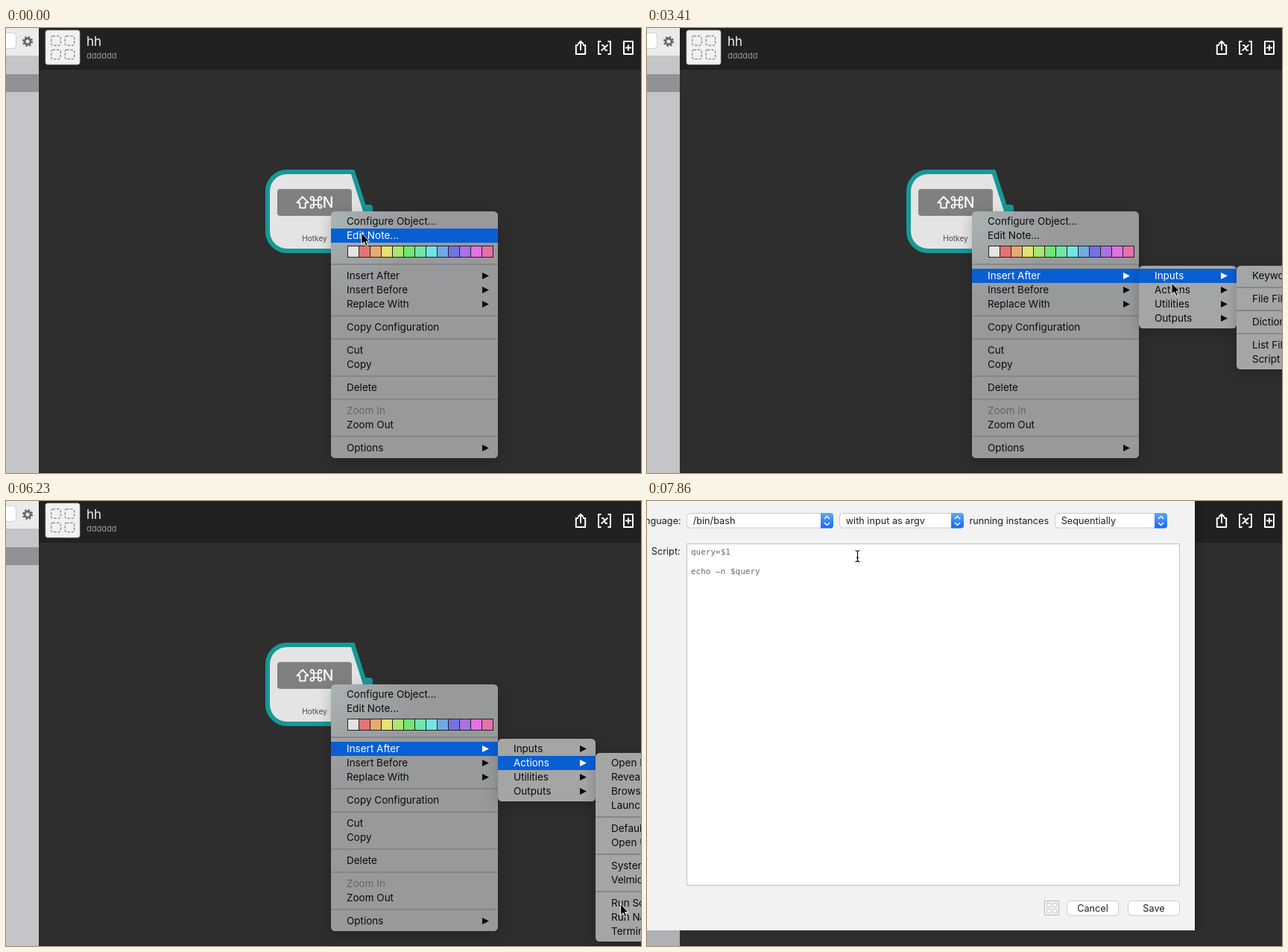
These frames come from a looping animation (852 by 597 pixels, 8 s). An HTML page:

```html
<!DOCTYPE html>
<html lang="en">
<head>
<meta charset="utf-8">
<title>Context menu</title>
<style>
html, body { margin: 0; width: 100%; height: 100%; overflow: hidden; background: #2e2e2e; }
svg { display: block; width: 100vw; height: 100vh; font-family: Inter, "Open Sans", sans-serif; }
text { white-space: pre; }
.menu { filter: drop-shadow(0 5px 9px rgba(0,0,0,.22)); }
.row { font-size: 13.5px; fill: #0b0b0c; }
.row rect { fill: none; }
.row.off { fill: #646669; }
.row.on { fill: #fff; }
.row.on rect { fill: #075fd3; }
.form { font-size: 12.7px; fill: #1f1f1f; }
.code { font: 11px "DejaVu Sans Mono", monospace; fill: #696969; }
.mid { text-anchor: middle; }
.end { text-anchor: end; }
</style>
</head>
<body>
<svg id="stage" viewBox="0 0 852 597" preserveAspectRatio="none"></svg>
<script>
const LOOP = 8000, TICKS = 54, TICK = LOOP / TICKS;
const TEAL = '#179896';
const stage = document.getElementById('stage');

const rect = (x, y, w, h, fill, more = '') =>
  `<rect x="${x}" y="${y}" width="${w}" height="${h}" fill="${fill}" ${more}/>`;
const text = (x, y, s, more = '') => `<text x="${x}" y="${y}" ${more}>${s}</text>`;
const path = (d, more = '') => `<path d="${d}" ${more}/>`;
const line = (d, color, w, more = '') =>
  path(d, `fill="none" stroke="${color}" stroke-width="${w}" ${more}`);
const group = (id, body, more = '') => `<g id="${id}" ${more}>${body}</g>`;

// Four dashed squares in a tile
function tile(x, y, size, color, w) {
  const s = size * .27, a = size * .17, b = size * .57;
  return [[a, a], [b, a], [a, b], [b, b]].map(([dx, dy]) =>
    rect(x + dx, y + dy, s, s, 'none',
      `rx="${size * .04}" stroke="${color}" stroke-width="${w}" stroke-dasharray="${size * .075} ${size * .04}"`)).join('');
}

function backdrop() {
  return rect(0, 0, 852, 597, '#2e2e2e') + rect(44, 0, 808, 56, '#212121') +
    rect(44, 596, 808, 1, '#232323') +
    rect(0, 0, 44, 597, '#c4c5c9') + rect(0, 0, 44, 37, '#ebebeb') + rect(0, 62, 44, 24, '#919296') +
    rect(-10, 6.5, 23.5, 21, '#fff', 'rx="4" stroke="#cfcfcf"') +
    '<g fill="none" stroke="#666"><circle cx="29" cy="18" r="4" stroke-width="2.8"/>' +
    '<circle cx="29" cy="18" r="6" stroke-width="2.2" stroke-dasharray="2.36 2.352"/></g>' +
    rect(53, 3, 46, 46, '#f1f1f1', 'rx="3" stroke="#bbb" stroke-width="1" stroke-dasharray="2 1"') +
    tile(53, 3, 46, '#666', 1) +
    text(108, 24, 'hh', 'font-size="17" fill="#f5f5f5"') +
    text(108, 41, 'dddddd', 'font-size="11" fill="#9b9b9b"');
}

function toolIcons() {
  return '<g stroke-linejoin="round">' +
    line('M768 23H764.8V35H777.2V23H774M771 30V18.5M767.3 21.5L771 17.8L774.7 21.5', '#fff', 2) +
    line('M798.5 18H795V35H798.5M807.5 18H811V35H807.5', '#fff', 2) +
    line('M799 23.5Q802 21.5 803 26.5T807 29.5M807.5 22.5L798.5 30.5', '#fff', 1.8) +
    line('M829 18H841V35H829ZM835 22.5V30.5M831 26.5H839', '#fff', 2) + '</g>';
}

const HOTKEY = 'M377 196H463L479 246L463 296H377A23 23 0 0 1 354 273V219A23 23 0 0 1 377 196Z';

function hotkey() {
  const loop = 'M413 231V237M419 231V237M413 231H419M413 237H419' +
    'M413 231H411A2.3 2.3 0 1 1 413 229ZM419 231V229A2.3 2.3 0 1 1 421 231Z' +
    'M419 237H421A2.3 2.3 0 1 1 419 239ZM413 237V239A2.3 2.3 0 1 1 411 237Z';
  return group('ring', path(HOTKEY, `fill="${TEAL}" stroke="${TEAL}" stroke-width="12"`) +
      rect(476, 237, 16, 18, TEAL, 'rx="4"')) +
    group('step', runScript()) +
    path(HOTKEY, 'fill="#e4e4e4"') + rect(364, 216, 100, 36, '#808080', 'rx="4"') +
    line('M398 226.5L390.3 234.3H394.3V241.3H401.7V234.3H405.7Z', '#fff', 1.8, 'stroke-linejoin="round"') +
    line(loop, '#fff', 1.7) +
    text(424.8, 241.2, 'N', 'font-size="19.5" font-weight="500" fill="#fff"') +
    text(414, 286, 'Hotkey', 'class="mid" font-size="10.1" fill="#4c4c4c"');
}

function runScript() {
  let rules = '';
  for (let y = 238; y < 260; y += 3) rules += `M565 ${y + .5}H588`;
  return rect(476, 243, 46, 6, TEAL) + rect(640, 237, 22, 18, TEAL, 'rx="4.5"') +
    rect(518, 190, 132, 112, TEAL, 'rx="10"') + rect(524, 196, 120, 100, '#e4e4e4', 'rx="5"') +
    text(584, 213, '/bin/bash', 'class="mid" font-size="11.8" fill="#202020"') +
    path('M561.5 227.5H583L592 236.5V264H561.5Z', 'fill="#fafafa" stroke="#777"') +
    path('M583 227.5V236.5H592Z', 'fill="#d2d2d2" stroke="#777"') +
    line('M565 232.5H579M565 235.5H579' + rules, '#9a9a9a', 1) +
    path('M594.5 236L606.5 249.5L594.5 262.5Z', 'fill="#47a9b8" stroke="#77868c"') +
    text(584, 286, 'Run Script', 'class="mid" font-size="10.2" fill="#4c4c4c"');
}

const SWATCHES = ['#e3e3e3', '#e57373', '#e5aa70', '#e5e370', '#aae570', '#70e572', '#70e5aa',
  '#70e5e3', '#70aae5', '#7272e5', '#aa70e5', '#e570e5', '#e570aa'];
const hits = {};

// Rows: "-" separator, "#" swatches, ">" submenu arrow, "!" disabled
function menu(id, x, top, w, fill, rows) {
  let y = top + 4, body = '';
  hits[id] = [];
  for (const row of rows.split('|')) {
    if (row === '-') {
      body += rect(x, y + 5, w, 2, '#858688');
      y += 12;
    } else if (row === '#') {
      body += SWATCHES.map((c, i) =>
        rect(x + 22.5 + i * 15, y + 4.5, 15, 15, c, 'stroke="#222"')).join('');
      y += 23;
    } else {
      const label = row.replace(/[>!]/, '');
      const mark = row.endsWith('>') ? path(`M${x + w - 21} ${y + 5}l9 4.5l-9 4.5z`) : '';
      body += `<g class="row${row.endsWith('!') ? ' off' : ''}" data-menu="${id}">` +
        `<rect x="${x}" y="${y}" width="${w}" height="19"/>` + text(x + 21, y + 14, label) + mark + '</g>';
      hits[id].push(y);
      y += 19;
    }
  }
  return group(id, rect(x, top, w, y + 4 - top, fill, 'rx="5.5"') + body, 'class="menu"');
}

const popup = (x, w, label) =>
  rect(x + .5, 16.5, w - 1, 19.5, '#fff', 'rx="4" stroke="#cacaca"') +
  path(`M${x + w - 17} 16H${x + w - 4}q4 0 4 4V32.5q0 4-4 4H${x + w - 17}Z`, 'class="blue" fill="url(#blue)"') +
  line(`M${x + w - 12} 24l3.5-3.5l3.5 3.5M${x + w - 12} 29l3.5 3.5l3.5-3.5`, '#fff', 1.5, 'class="chev"') +
  text(x + 8.7, 31, label);

const button = (x, label) =>
  rect(x + .5, 536.5, 69, 19.5, '#fff', 'rx="4" stroke="#cbcbcb"') + text(x + 35, 551, label, 'class="mid"');

function sheet() {
  return rect(-30, -30, 765, 606, '#f2f2f2') + '<g class="form">' +
    text(45.7, 31, 'Language:', 'class="end"') + popup(53, 197, '/bin/bash') +
    popup(258, 167, 'with input as argv') + text(432.5, 31, 'running instances') +
    popup(547, 151, 'Sequentially') + text(44.7, 72, 'Script:', 'class="end"') +
    rect(53.5, 57.5, 661, 458, '#fff', 'stroke="#bfbfbf"') +
    rect(533.5, 536.5, 19, 19, '#f8f8f8', 'stroke="#777" stroke-dasharray="1 1"') +
    tile(533, 536, 20, '#999', .8) + button(563, 'Cancel') + button(645, 'Save') + '</g>' +
    text(59, 72, 'query=$1', 'class="code"') + text(59, 98, 'echo –n $query', 'class="code"') +
    rect(151, 88, 1, 13, '#000', 'id="caret"');
}

const BEAM = 'M-3 -7.5Q0 -7.5 0 -5.5Q0 -7.5 3 -7.5M0 -6V6M-3 7.5Q0 7.5 0 5.5Q0 7.5 3 7.5M-1.8 2H1.8';

stage.innerHTML =
  '<defs><linearGradient id="blue" x2="0" y2="1"><stop stop-color="#5ba9fb"/><stop offset="1" stop-color="#1669f3"/></linearGradient>' +
  '<radialGradient id="glass" gradientUnits="userSpaceOnUse" cx="436" cy="256" r="110">' +
  '<stop stop-color="#aab4b4"/><stop offset=".45" stop-color="#a1a6a7"/><stop offset="1" stop-color="#98999b"/></radialGradient>' +
  '<linearGradient id="shade"><stop stop-color="#000" stop-opacity=".16"/><stop offset="1" stop-color="#000" stop-opacity="0"/></linearGradient></defs>' +
  backdrop() + toolIcons() + hotkey() +
  menu('main', 436, 246, 224, 'url(#glass)', 'Configure Object...|Edit Note...|#|-|Insert After>|Insert Before>|' +
    'Replace With>|-|Copy Configuration|-|Cut|Copy|-|Delete|-|Zoom In!|Zoom Out|-|Options>') +
  menu('sub', 660, 319, 131, '#a4a5a5', 'Inputs>|Actions>|Utilities>|Outputs>') +
  menu('inputs', 791, 319, 180, '#a4a5a5', 'Keyword|-|File Filter|-|Dictionary Filter|-|List Filter|Script Filter') +
  menu('actions', 791, 338, 180, '#a4a5a5', 'Open File|Reveal File|Browse Files|Launch Apps|-|Default Search|' +
    'Open URL|-|System Command|Velmio|-|Run Script|Run Native Script|Terminal Command') +
  group('shadow', rect(735, 0, 1, 576, '#222') + rect(736, 0, 17, 576, 'url(#shade)')) +
  group('under', rect(0, 576, 44, 21, '#000', 'opacity=".1"')) +
  group('sheet', sheet()) +
  group('arrow', path('M0 0V15.2L3.5 12L6 17.6L8.4 16.6L6 11.2H10.6Z', 'fill="#000" stroke="#fff" stroke-width="1"')) +
  group('beam', line(BEAM, '#fff', 2.8) + line(BEAM, '#000', 1.1));

// Pointer: tick, x, y
const POINTER = [
  [0, 477, 275], [1, 478, 283], [2, 482, 318], [3, 489, 370], [4, 492, 402],
  [7, 494, 396], [8, 498, 370], [9, 504, 345], [10, 507, 333],
  [12, 524, 331.5], [13, 575, 331], [14, 635, 330], [15, 680, 330], [16, 699, 331], [17, 702, 331],
  [23, 704, 342], [24, 703, 350], [25, 701, 355], [26, 700, 357],
  [28, 751.5, 361.5], [29, 784, 388], [30, 804, 430], [31, 815, 480], [32, 822, 522], [33, 824.5, 540.5],
  [45, 800, 515], [46, 735, 450], [47, 670, 385], [48, 635.5, 343.5],
  [49, 466, 142], [50, 456, 135], [52, 380, 105], [53, 282.5, 74]
];

const el = id => document.getElementById(id);
const rows = id => [...document.querySelectorAll(`.row[data-menu=${id}]`)];
const menus = Object.fromEntries(Object.keys(hits).map(id => [id, rows(id)]));
const blues = [...document.querySelectorAll('.blue')], chevs = [...document.querySelectorAll('.chev')];

const show = (id, on) => { el(id).style.display = on ? '' : 'none'; };
const pick = (id, n) => menus[id].forEach((row, i) => row.classList.toggle('on', i === n));
const rowAt = (id, y) => hits[id].findIndex(top => y >= top && y < top + 19);

function draw(n) {
  const [, x, y] = POINTER.filter(p => p[0] <= n).pop();
  const open = n < 44, active = n >= 50;

  show('main', open);
  show('sub', open && n >= 12);
  show('inputs', n >= 17 && n < 25);
  show('actions', open && n >= 25);
  pick('main', n < 10 ? rowAt('main', y) : 2);
  pick('sub', n < 15 ? -1 : n < 24 ? 0 : 1);
  pick('actions', n >= 30 && n !== 42 ? rowAt('actions', y) : -1);

  show('ring', open);
  show('step', !open);
  show('shadow', n >= 48);
  show('sheet', n >= 49);
  show('under', n >= 49);
  show('caret', active && n < 53);
  blues.forEach(b => { b.style.display = active ? '' : 'none'; });
  chevs.forEach(c => c.setAttribute('stroke', active ? '#fff' : '#555'));

  show('arrow', n < 48);
  show('beam', n >= 48);
  el(n < 48 ? 'arrow' : 'beam').setAttribute('transform', `translate(${x} ${y})`);
}

let last = -1;
const start = performance.now();
function frame(now) {
  const t = Math.max(0, now - start) % LOOP;
  const n = Math.min(TICKS - 1, Math.floor((t + 9) / TICK));
  if (n !== last) draw(last = n);
  requestAnimationFrame(frame);
}
draw(0);
requestAnimationFrame(frame);
</script>
</body>
</html>
```
